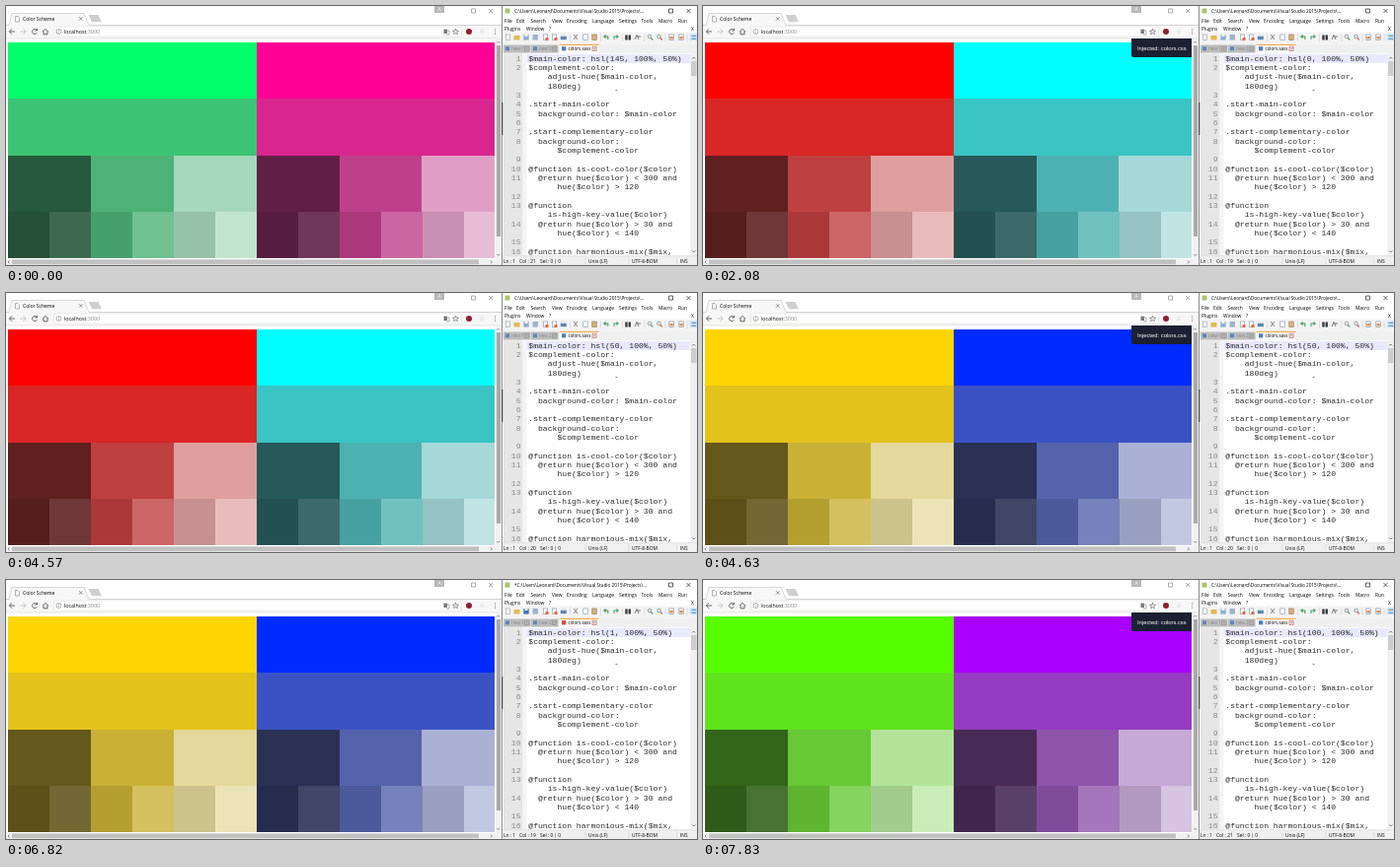
Write an HTML page that moves like this. It is 700 px wide and 263 px high and loops after 8000 ms.

```html
<!DOCTYPE html>
<html lang="en">
<head>
<meta charset="utf-8">
<title>Color Scheme</title>
<style>
  html, body { margin: 0; width: 700px; height: 263px; overflow: hidden; background: #fff; }
  svg { display: block; }
  text { font-family: "Open Sans", "Noto Sans", sans-serif; font-size: 4.85px; fill: #000; white-space: pre; }
  .code text { font-family: "Liberation Mono", "Courier New", monospace; font-size: 8.1px; fill: #2a2a2a; }
  .code .num { fill: #8a8a8a; text-anchor: end; }
  .line { fill: none; stroke: #555; stroke-width: .8; }
</style>
</head>
<body>
<svg id="stage" width="700" height="263" viewBox="0 0 700 263"></svg>
<script>
const NS = 'http://www.w3.org/2000/svg';
const stage = document.getElementById('stage');

function add(tag, attrs, parent = stage) {
  const el = document.createElementNS(NS, tag);
  for (const key in attrs) el.setAttribute(key, attrs[key]);
  parent.appendChild(el);
  return el;
}
const rect = (x, y, width, height, fill, parent) => add('rect', { x, y, width, height, fill }, parent);
const line = (d, stroke = '#555', width = .8) => add('path', { d, class: 'line', style: `stroke:${stroke};stroke-width:${width}` });
function label(x, y, str, style = '', parent) {
  const el = add('text', { x, y, style }, parent);
  el.textContent = str;
  return el;
}

// ---------- Browser window ----------
function drawBrowser() {
  rect(0, 0, 502, 263, '#fff');
  rect(0, 19, 502, 14, '#f7f7f7');
  add('path', { d: 'M3.4 20L6.3 8H78.7L83.6 20Z', fill: '#f7f7f7' });
  line('M0 19.5H3L6 7.5H79L84 19.5H502', '#c4c4c4', .7);
  add('path', { d: 'M83.5 9H93.5L97 16.2H87Z', fill: '#cfcfcf' });
  line('M9.5 10.5H12L13.5 12V16H9.5Z', '#888', .6);
  label(17, 14.9, 'Color Scheme', 'font-size:5px');
  line('M74 11.2l3.4 3.4m0 -3.4l-3.4 3.4', '#666', .7);

  rect(434, 0, 10, 7, '#b9b9b9');
  label(437.4, 5.3, 'A', 'font-size:5px;fill:#fff');
  line('M471.5 3H475.5V7H471.5Z', '#777', .6);
  line('M489 3l4 4m0 -4l-4 4', '#777', .6);

  line('M9 26H3.5M6 23.3L3.4 26L6 28.7', '#444');
  line('M14.5 26H20M17.5 23.3L20.1 26L17.5 28.7', '#bbb');
  line('M31 24.4A2.5 2.5 0 1 0 31.4 27M31.5 22.8V25H29.3', '#444');
  line('M37 26.2L40 23.3L43 26.2M38 25.7V28.8H42V25.7', '#444');
  add('rect', { x: 48.5, y: 21, width: 413, height: 10, rx: 1, fill: '#fff', stroke: '#dedede', 'stroke-width': .6 });
  add('circle', { cx: 53.5, cy: 26, r: 2.5, class: 'line', style: 'stroke:#777;stroke-width:.6' });
  line('M53.5 25.6V27.4M53.5 24.4V25', '#777', .6);
  const url = label(59, 27.9, 'localhost', 'font-size:5.35px');
  const port = add('tspan', { style: 'fill:#888' }, url);
  port.textContent = ':3000';
  rect(443.5, 23.6, 3.4, 4.4, '#777');
  line('M446 25H449V29H445.8', '#777', .6);
  line('M455.5 23L456.3 25.2H458.6L456.8 26.6L457.4 28.8L455.5 27.5L453.6 28.8L454.2 26.6L452.4 25.2H454.7Z', '#555', .6);
  add('circle', { cx: 469, cy: 26, r: 3, fill: '#8d1f30' });
  add('circle', { cx: 482, cy: 26, r: 2.4, fill: '#ececec' });
  for (const y of [23.8, 26, 28.2]) add('circle', { cx: 495.5, cy: y, r: .6, fill: '#777' });
  line('M0 33H502', '#d5d5d5', .6);

  rect(496, 33.3, 6, 223.7, '#f1f1f1');
  rect(497, 40, 4, 194, '#a9a9a9');
  line('M497.2 37.5L498.6 36L500 37.5M497.2 252L498.6 253.5L500 252', '#666', .7);
  rect(0, 257, 502, 6, '#f1f1f1');
  rect(6, 257.5, 473, 4.8, '#c1c1c1');
  line('M3.5 258.5L2 260L3.5 261.5M491 258.5L492.5 260L491 261.5', '#555', .7);
}

// Each half of the page has rows of 1, 1, 3 and 6 swatches.
const HALF = 251.8;
const ROWS = [
  { y: 37, end: 94, width: HALF, kind: 'pure', lights: [50] },
  { y: 94, end: 152, width: HALF, kind: 'strong', lights: [50] },
  { y: 152, end: 209, width: HALF * .333, kind: 'soft', lights: [25, 50, 75] },
  { y: 209, end: 256, width: HALF / 6, kind: 'soft', lights: [22.5, 32.5, 45, 60, 67.5, 82.5] }
];

function saturation(hue) {
  if (hue > 30 && hue < 140) return { pure: 100, strong: 78, soft: 58 };
  if (hue > 120 && hue < 300) return { pure: 100, strong: 54, soft: hue > 200 ? 34 : 39 };
  return { pure: 100, strong: 70, soft: 50 };
}

const swatches = [];
function drawSwatches() {
  for (const { y, end, width, kind, lights } of ROWS) {
    for (let half = 0; half < 2; half++) {
      const edge = k => Math.min(495, Math.round(2 + half * HALF + k * width));
      lights.forEach((light, i) => {
        const muted = lights.length === 6 && (i === 1 || i === 4);
        const el = rect(edge(i), y, edge(i + 1) - edge(i), end - y, '#fff');
        swatches.push({ el, half, light, kind, factor: muted ? .67 : 1 });
      });
    }
  }
}

function paint(hue) {
  for (const s of swatches) {
    const h = (hue + s.half * 180) % 360;
    s.el.setAttribute('fill', `hsl(${h}, ${saturation(h)[s.kind] * s.factor}%, ${s.light}%)`);
  }
}

// ---------- Editor window ----------
const CODE_X = 529.3, CHAR = 4.86, ROW_H = 9.33;
// [line number, indent, text]
const CODE = [
  [1, 0, ''],
  [2, 0, '$complement-color:'],
  ['', 4, 'adjust-hue($main-color,'],
  ['', 4, '180deg)'],
  [3, 0, ''],
  [4, 0, '.start-main-color'],
  [5, 2, 'background-color: $main-color'],
  [6, 0, ''],
  [7, 0, '.start-complementary-color'],
  [8, 2, 'background-color:'],
  ['', 6, '$complement-color'],
  [9, 0, ''],
  [10, 0, '@function is-cool-color($color)'],
  [11, 2, '@return hue($color) < 300 and'],
  ['', 6, 'hue($color) > 120'],
  [12, 0, ''],
  [13, 0, '@function'],
  ['', 4, 'is-high-key-value($color)'],
  [14, 2, '@return hue($color) > 30 and'],
  ['', 6, 'hue($color) < 140'],
  [15, 0, ''],
  [16, 0, '@function harmonious-mix($mix,']
];
const PATH = 'C:\\Users\\Leonard\\Documents\\Visual Studio 2015\\Projects\\...';
const ui = {};

function drawToolbar() {
  rect(503, 26.5, 197, 12, '#f3f3f3');
  const page = (x, fill, edge) =>
    add('rect', { x: x - 2.2, y: 29, width: 4.4, height: 5.6, fill, stroke: edge, 'stroke-width': .6 });
  page(508.5, '#fff', '#8a9aa8');
  rect(514.5, 30, 6, 4.5, '#e3b94f');
  ui.save = rect(524.3, 29, 5.4, 5.6, '#8eaed0');
  rect(525.5, 29, 3, 2, '#f4f7fb');
  rect(533.5, 29, 5.4, 5.6, '#9db3cb');
  for (const x of [546.5, 555.5]) {
    page(x, '#fff', '#7e93a8');
    rect(x, 32, 3, 3, '#d96b4a');
  }
  rect(561.8, 30.6, 6, 3.6, '#5a86b5');
  rect(563, 28.8, 3.6, 2, '#dce6ef');
  line('M575 29L579 34M579 29L575 34', '#777', .9);
  page(587, '#fff', '#7e93a8');
  page(596, '#d8b27a', '#8b744e');
  line('M609.8 34V31H606M607.6 29.3L605.8 31L607.6 32.7', '#3f9a55', 1.1);
  line('M616 34V31H620M618.4 29.3L620.2 31L618.4 32.7', '#4a9f74', 1.1);
  rect(627.3, 29.5, 2.3, 5, '#333');
  rect(630.6, 29.5, 2.3, 5, '#333');
  line('M637 34L639 29.5L641 34M640 31H643', '#666', .9);
  for (const [x, tint] of [[652, '#4d9158'], [661.5, '#c0524b']]) {
    add('circle', { cx: x, cy: 31, r: 1.9, fill: '#dfe8ef', stroke: '#777', 'stroke-width': .6 });
    line(`M${x + 1.4} 32.5l1.8 1.9`, tint, 1.1);
  }
  for (const x of [674, 684]) {
    page(x, '#fff', '#77869a');
    rect(x - 1.6, 31, 3.4, 2.4, '#dd8b4f');
  }
  rect(692.6, 28.3, 7.4, 7, '#cde4f7');
  line('M694.5 30.3H699M694.5 33.3H699', '#3d70a8', .8);
  for (const x of [571.5, 602.5, 624.5, 646.8, 668, 690]) line(`M${x} 28.5V35.5`, '#cfcfcf', .6);
}

function drawTabs() {
  const closeBox = (x, tint) => line(`M${x} 41.3h4.2v4.2h-4.2zM${x + 1} 42.3l2.2 2.2m0 -2.2l-2.2 2.2`, tint, .6);
  rect(503, 38.5, 197, 10, '#f0f0f0');
  for (const [x, name] of [[504, 'new 1'], [532, 'new 2']]) {
    rect(x, 39.5, 27.5, 8, '#bdbdbd');
    rect(x + 2, 41.3, 4, 4, '#5b88bd');
    label(x + 8, 45.2, name, 'font-size:4.6px;fill:#8a8a8a');
    closeBox(x + 21.5, '#8a8a8a');
  }
  rect(560.5, 38.8, 40, 9.4, '#f8f8f8');
  rect(560.5, 38.8, 40, 1.1, '#f5a548');
  ui.disk = rect(563, 41.2, 4.2, 4.2, '#4c7fc0');
  label(569.5, 45.2, 'colors.sass', 'font-size:4.5px');
  closeBox(594, '#b05050');
}

function drawCode() {
  rect(503, 48.3, 190, 205.5, '#fff');
  rect(504, 48.3, 19.5, 205.5, '#e6e6e6');
  rect(523.5, 48.3, 4, 205.5, '#f4f4f4');
  rect(527.5, 49, 166, 9, '#e8e8ff');
  const code = add('g', { class: 'code' });
  CODE.forEach(([num, indent, str], i) => {
    const y = 55.8 + i * ROW_H;
    label(521.5, y, num, '', code).setAttribute('class', 'num');
    const row = label(CODE_X + indent * CHAR, y, str, '', code);
    if (i === 0) ui.first = row;
  });
  ui.caret = rect(0, 49, 1, 9, '#222');
  rect(617.5, 85, 2, 1, '#888');

  rect(693.3, 48.3, 6.7, 205.5, '#f0f0f0');
  rect(694, 56, 5.4, 15, '#cdcdcd');
  line('M695.2 53.5L696.7 52L698.2 53.5M695.2 248.5L696.7 250L698.2 248.5', '#555', .8);
}

function drawEditor() {
  rect(502, 0, 198, 263, '#fff');
  rect(505.5, 2.5, 5, 5, '#a8c66c');
  ui.title = label(515, 6.8, '', 'font-size:4.7px');
  line('M671.5 3H675.5V7H671.5Z', '#222', .7);
  line('M689.5 3l4 4m0 -4l-4 4', '#222', .7);
  const menu = { File: 505, Edit: 517, Search: 531.5, View: 553, Encoding: 568, Language: 594, Settings: 621, Tools: 643.5, Macro: 661, Run: 681 };
  for (const name in menu) label(menu[name], 16.8, name);
  label(505, 24.6, 'Plugins');
  label(527, 24.6, 'Window');
  label(550, 24.6, '?');
  label(694, 24.6, 'X');
  drawToolbar();
  drawTabs();
  drawCode();

  rect(503, 253.7, 197, 9.3, '#f0f0f0');
  line('M503 253.8H700', '#d0d0d0', .6);
  label(504, 260.5, 'Ln : 1');
  label(520, 260.5, 'Col :');
  ui.col = label(531.2, 260.5, '');
  label(541, 260.5, 'Sel : 0 | 0');
  label(590, 260.5, 'Unix (LF)');
  label(634, 260.5, 'UTF-8-BOM');
  label(683, 260.5, 'INS');
  for (const x of [587, 631, 679.5]) line(`M${x} 255.5V262`, '#d0d0d0', .6);
  rect(502, 0, 1, 263, '#8c8c8c');
  rect(502, 98, 1.3, 33, '#444');
}

function drawNotice() {
  ui.notice = add('g', {});
  add('path', { d: 'M434 33H495V52H436Q434 52 434 50Z', fill: '#1b2032' }, ui.notice);
  label(440, 44.8, 'Injected: colors.css', 'font-family:"Liberation Sans",sans-serif;font-size:5.85px;fill:#fff', ui.notice);
}

// ---------- Timeline: each step changes part of the state ----------
const LOOP = 8000;
const START = { value: '145', hue: 145, notice: false, dirty: false, caret: false };
const on = { caret: true }, off = { caret: false };
const STEPS = [
  [0, {}], [130, on], [430, off],
  [660, { value: '14', dirty: true }],
  [740, { value: '' }],
  [1530, { value: '0' }],
  [1990, { dirty: false, notice: true }],
  [2080, { hue: 0 }],
  [3700, { value: '', dirty: true }],
  [4010, { value: '5', notice: false }],
  [4110, { value: '50', caret: true }],
  [4330, off],
  [4570, { dirty: false }],
  [4630, { hue: 50, notice: true }],
  [4860, on], [5090, off], [5320, on], [5570, off], [5780, on], [6100, off], [6350, on],
  [6500, { value: '5', dirty: true, caret: false }],
  [6600, { value: '' }],
  [6670, { notice: false }],
  [6820, { value: '1' }],
  [6990, { value: '10' }],
  [7150, { value: '100', caret: true }],
  [7370, off],
  [7540, { dirty: false }],
  [7630, { notice: true, caret: true }],
  [7690, { hue: 100 }],
  [7830, off]
];
let last = START;
const states = STEPS.map(([time, change]) => {
  last = { ...last, ...change };
  return { time, ...last };
});

function show(s) {
  const before = '$main-color: hsl(' + s.value;
  ui.first.textContent = before + ', 100%, 50%)';
  ui.col.textContent = before.length + 1;
  ui.caret.setAttribute('x', Math.floor(CODE_X + before.length * CHAR));
  ui.caret.style.display = s.caret ? '' : 'none';
  ui.notice.style.display = s.notice ? '' : 'none';
  ui.title.textContent = (s.dirty ? '*' : '') + PATH;
  ui.disk.setAttribute('fill', s.dirty ? '#d2493c' : '#4c7fc0');
  ui.save.setAttribute('fill', s.dirty ? '#3f78bd' : '#8eaed0');
  paint(s.hue);
}

drawBrowser();
drawSwatches();
drawEditor();
drawNotice();

const begin = performance.now();
let shown = null;
function tick() {
  const t = (performance.now() - begin) % LOOP;
  const state = states.filter(s => s.time <= t).pop() || states[0];
  if (state !== shown) show(shown = state);
  requestAnimationFrame(tick);
}
tick();
</script>
</body>
</html>
```
